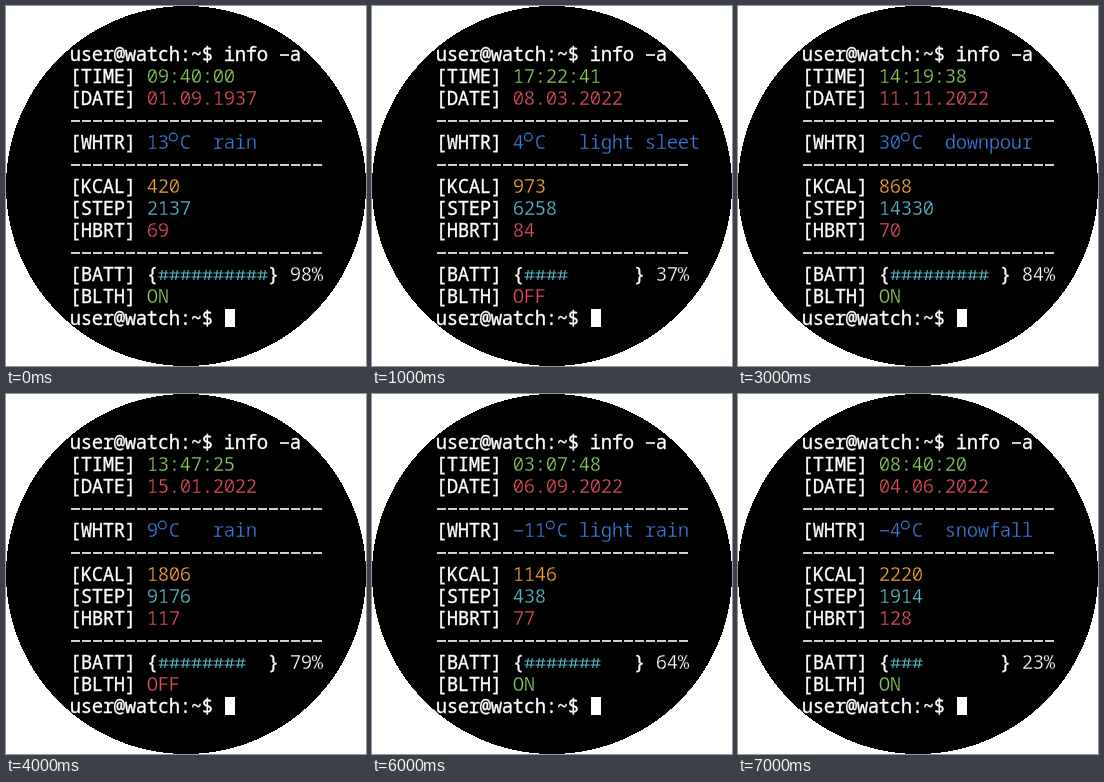
These frames come from a looping animation (360x360 px, 8000 ms). An HTML page with a canvas:

```html
<!DOCTYPE html>
<html lang="en">
<head>
<meta charset="utf-8">
<title>Terminal watch face</title>
<style>
  html, body { margin: 0; width: 100%; height: 100%; overflow: hidden; background: #fff; }
  canvas { display: block; width: 360px; height: 360px; }
</style>
</head>
<body>
<canvas id="face" width="360" height="360"></canvas>
<script>
const ctx = document.getElementById('face').getContext('2d');
const RADIUS = 180, LEFT = 64, CELL = 11, FIRST_BASELINE = 54.5, LINE = 22;
const WHITE = '#fff', BLACK = '#000', GREEN = '#8fce5c', RED = '#e0505c',
      BLUE = '#3b7ce0', ORANGE = '#f2a534', TEAL = '#58bcca';
const PROMPT = 'user@watch:~$ ';
const STEP_MS = 1000;

const readings = [
  { time: '09:40:00', date: '01.09.1937', temp: 13, sky: 'rain', kcal: 420, steps: 2137, pulse: 69, battery: 98, linked: true },
  { time: '17:22:41', date: '08.03.2022', temp: 4, sky: 'light sleet', kcal: 973, steps: 6258, pulse: 84, battery: 37, linked: false },
  { time: '03:56:02', date: '25.12.2022', temp: -8, sky: 'snow & rain', kcal: 1221, steps: 13094, pulse: 123, battery: 52, linked: false },
  { time: '14:19:38', date: '11.11.2022', temp: 30, sky: 'downpour', kcal: 868, steps: 14330, pulse: 70, battery: 84, linked: true },
  { time: '13:47:25', date: '15.01.2022', temp: 9, sky: 'rain', kcal: 1806, steps: 9176, pulse: 117, battery: 79, linked: false },
  { time: '20:31:56', date: '27.08.2022', temp: 21, sky: 'sunny', kcal: 592, steps: 7605, pulse: 92, battery: 46, linked: true },
  { time: '03:07:48', date: '06.09.2022', temp: -11, sky: 'light rain', kcal: 1146, steps: 438, pulse: 77, battery: 64, linked: true },
  { time: '08:40:20', date: '04.06.2022', temp: -4, sky: 'snowfall', kcal: 2220, steps: 1914, pulse: 128, battery: 23, linked: true }
];

// Row by row, so that the rim stays hard-edged.
function drawDial() {
  ctx.fillStyle = WHITE;
  ctx.fillRect(0, 0, 2 * RADIUS, 2 * RADIUS);
  ctx.fillStyle = BLACK;
  for (let y = 0; y < 2 * RADIUS; y++) {
    const half = Math.round(Math.sqrt(RADIUS ** 2 - (y + 0.5 - RADIUS) ** 2));
    ctx.fillRect(RADIUS - half, y, 2 * half, 1);
  }
}

function drawDegree(center, baseline) {
  ctx.lineWidth = 1.2;
  ctx.beginPath();
  ctx.arc(center - 1.2, baseline - 11.4, 3.9, 0, Math.PI * 2);
  ctx.stroke();
}

function drawHash(center, baseline) {
  const middle = baseline - 5.5;
  ctx.lineWidth = 1.1;
  ctx.beginPath();
  for (const offset of [-2, 2]) {
    ctx.moveTo(center - 5, middle + offset);
    ctx.lineTo(center + 5, middle + offset);
    ctx.moveTo(center + offset + 0.8, middle - 5);
    ctx.lineTo(center + offset - 0.8, middle + 5);
  }
  ctx.stroke();
}

// A thin outline thickens the glyph in its own colour or thins it in black.
function drawGlyph(char, center, baseline, color, light) {
  ctx.fillText(char, center, baseline);
  ctx.strokeStyle = light ? BLACK : color;
  ctx.lineWidth = 0.3;
  ctx.strokeText(char, center, baseline);
}

function drawChar(char, col, baseline, color, light) {
  const center = LEFT + (col + 0.5) * CELL;
  ctx.fillStyle = ctx.strokeStyle = color;
  if (char === '-') ctx.fillRect(center - 4.5, baseline - 6.3, 9, light ? 1.2 : 1.6);
  else if (char === '°') drawDegree(center, baseline);
  else if (char === '#') drawHash(center, baseline);
  else drawGlyph(char, center, baseline, color, light);
}

function write(text, row, col, color = WHITE, light = false) {
  const baseline = FIRST_BASELINE + row * LINE;
  [...String(text)].forEach((char, i) => {
    if (char !== ' ') drawChar(char, col + i, baseline, color, light);
  });
}

function field(row, label, value, color) {
  write(`[${label}]`, row, 0);
  write(value, row, 7, color, true);
}

function draw(r) {
  drawDial();
  write(PROMPT + 'info -a', 0, 0);
  field(1, 'TIME', r.time, GREEN);
  field(2, 'DATE', r.date, RED);
  field(4, 'WHTR', `${r.temp}°C`.padEnd(6) + r.sky, BLUE);
  field(6, 'KCAL', r.kcal, ORANGE);
  field(7, 'STEP', r.steps, TEAL);
  field(8, 'HBRT', r.pulse, RED);
  for (const row of [3, 5, 9]) write('-'.repeat(23), row, 0);

  write('[BATT] {          }', 10, 0);
  write('#'.repeat(Math.ceil(r.battery / 10)), 10, 8, TEAL, true);
  write(`${r.battery}%`, 10, 20, WHITE, true);
  field(11, 'BLTH', r.linked ? 'ON' : 'OFF', r.linked ? GREEN : RED);
  write(PROMPT, 12, 0);
  ctx.fillStyle = WHITE;
  ctx.fillRect(219, 303, 10, 18);
}

ctx.font = '19px "Noto Sans Mono", "DejaVu Sans Mono", monospace';
ctx.textAlign = 'center';
ctx.textBaseline = 'alphabetic';
ctx.lineJoin = 'round';

function tick() {
  draw(readings[Math.floor(performance.now() / STEP_MS) % readings.length]);
  requestAnimationFrame(tick);
}
tick();
</script>
</body>
</html>
```
